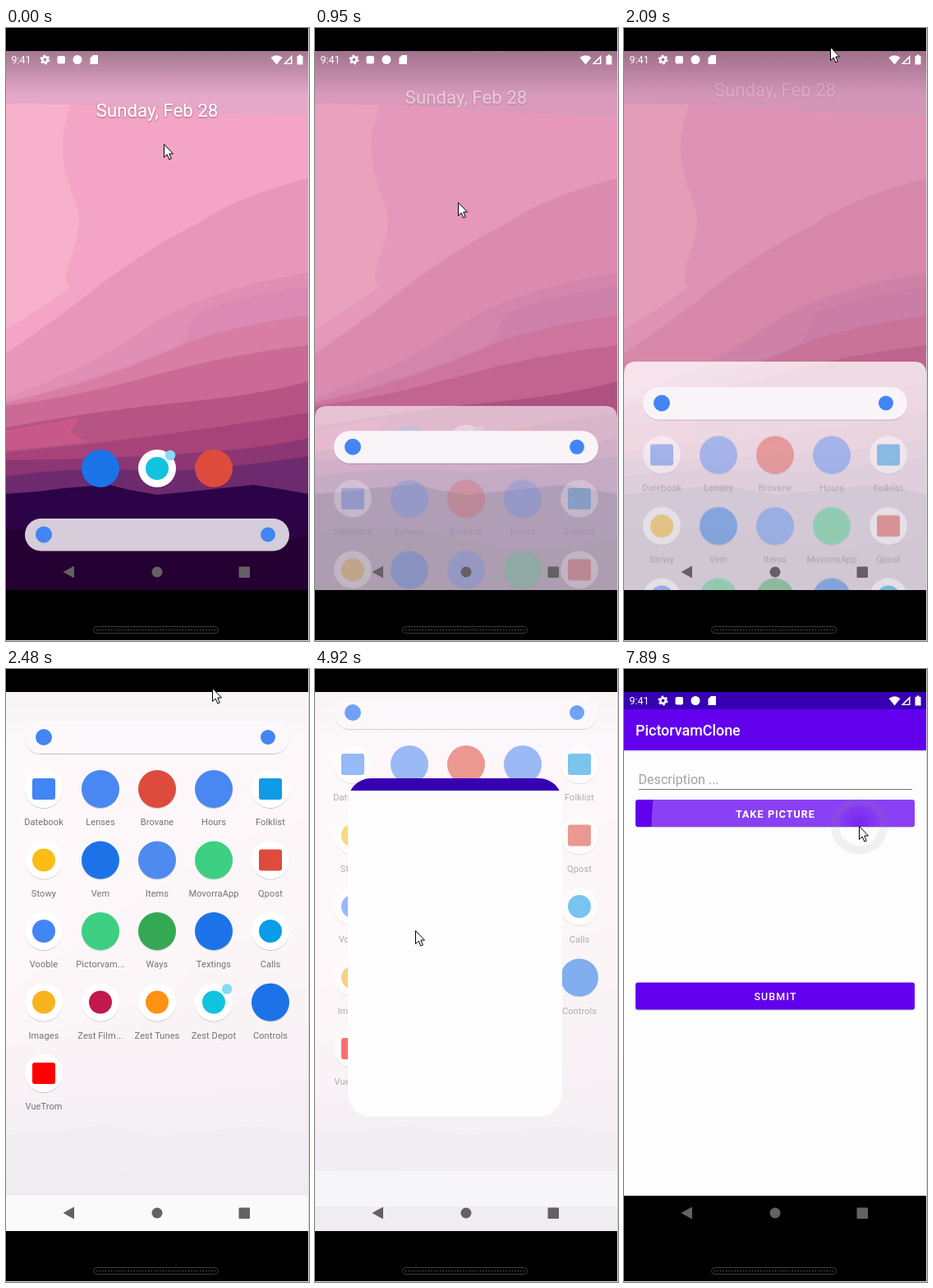
Write an HTML page that moves like this. It is 369 px wide and 746 px high and loops after 8 s.

```html
<!DOCTYPE html>
<html lang="en">
<head>
<meta charset="utf-8">
<title>Launcher demo</title>
<style>
  html, body { margin: 0; width: 100%; height: 100%; overflow: hidden; background: #000; }
  svg { display: block; width: 369px; height: 746px; font-family: Roboto, sans-serif; }
  .label { font-size: 11px; letter-spacing: .1px; fill: #737173; text-anchor: middle; }
  .button { font-size: 12.5px; font-weight: 500; letter-spacing: 1.12px; fill: #fff; text-anchor: middle; }
</style>
</head>
<body>
<svg viewBox="0 0 369 746">
  <defs>
    <linearGradient id="topShade" x2="0" y2="1">
      <stop offset="0" stop-color="#5c4556" stop-opacity=".48"/>
      <stop offset="1" stop-color="#5c4556" stop-opacity="0"/>
    </linearGradient>
    <radialGradient id="pressGlow">
      <stop offset="0" stop-color="#6a12ee" stop-opacity=".6"/>
      <stop offset="1" stop-color="#6a12ee" stop-opacity="0"/>
    </radialGradient>
    <filter id="textShadow" x="-10%" y="-50%" width="120%" height="200%">
      <feDropShadow dx="0" dy="1" stdDeviation="1" flood-color="#503040" flood-opacity=".6"/>
    </filter>
    <filter id="discShadow" x="-20%" y="-20%" width="140%" height="150%">
      <feDropShadow dx="0" dy="1" stdDeviation=".5" flood-color="#000" flood-opacity=".22"/>
    </filter>
    <clipPath id="screen"><rect y="28" width="368" height="656"/></clipPath>
    <clipPath id="windowClip"><rect id="windowShape"/></clipPath>
    <clipPath id="buttonClip"><rect x="14" y="159" width="340" height="33" rx="3"/></clipPath>
  </defs>

  <rect width="369" height="746"/>
  <g clip-path="url(#screen)">
    <g id="wallpaper">
      <rect y="28" width="368" height="656" fill="#f4a5c5"/>
      <path fill="#f8b1ca" d="M0 92H80C56 150 76 186 88 224C94 262 62 300 78 316Q30 350 0 366Z"/>
      <path fill="#e6a8c8" d="M0 28H368V107L250 103Q110 92 0 92Z"/>
      <path fill="#e997b8" d="M0 396Q60 356 120 308Q190 258 230 240Q280 205 368 183V684H0Z"/>
      <path fill="#e08fb5" d="M0 450Q110 410 170 366Q240 318 368 298V684H0Z"/>
      <path fill="#da8ab3" d="M0 456Q120 424 210 386C232 374 218 354 240 344Q290 326 368 314V684H0Z"/>
      <path fill="#d87da4" d="M0 456Q120 430 228 380Q290 360 368 350V684H0Z"/>
      <path fill="#cb6a95" d="M0 460Q100 446 190 420Q270 398 368 386V684H0Z"/>
      <path fill="#b65484" d="M0 486Q120 464 230 454Q310 446 368 430V684H0Z"/>
      <path fill="#c9588a" d="M0 490L90 474L78 492L100 504L0 514Z"/>
      <path fill="#a8437a" d="M0 516Q180 500 368 468V684H0Z"/>
      <path fill="#8c3673" d="M0 526Q150 524 240 516Q310 512 368 499V684H0Z"/>
      <path fill="#6e2a6e" d="M0 546Q90 532 190 540Q290 534 368 521V684H0Z"/>
      <path fill="#2c0346" d="M0 567L40 564L70 560L96 558L122 555L150 562L184 568L236 563L272 559L302 556L334 561L368 567V684H0Z"/>
      <path fill="#240033" d="M0 612Q90 600 180 622T368 618V684H0Z"/>
      <rect y="28" width="368" height="54" fill="url(#topShade)"/>
    </g>
    <rect id="dim" y="28" width="368" height="656" fill="#8a4a70"/>
    <text id="date" x="184" y="108" font-size="22.3" fill="#fff" text-anchor="middle" filter="url(#textShadow)">Sunday, Feb 28</text>
    <g id="dock"></g>
    <path id="sheet" fill="#fff"/>
    <g id="drawer">
      <rect id="navScrim" y="641" width="368" height="43" fill="#fff"/>
      <g id="content">
        <g id="searchBar">
          <rect id="searchFill" x="23" y="-19.5" width="322" height="39.5" rx="19.7"/>
          <circle cx="46" r="10" fill="#4285f4"/>
          <circle cx="319" r="9" fill="#4285f4"/>
        </g>
        <g id="icons"></g>
      </g>
    </g>
    <circle id="press" cx="115" cy="319" r="25"/>
    <g id="window" clip-path="url(#windowClip)">
      <rect y="28" width="368" height="656" fill="#fdfdfd"/>
      <rect id="windowBar" width="368" fill="#3700b3"/>
    </g>
    <rect id="navBlack" y="641" width="368" height="43"/>
    <g id="app">
      <rect y="99" width="368" height="2" fill="#000" opacity=".1"/>
      <rect y="49" width="368" height="50" fill="#6200ee"/>
      <text x="14" y="81" font-size="17.9" font-weight="500" fill="#fff">PictorvamClone</text>
      <text x="17.5" y="140" font-size="16.1" fill="#a2a2a2">Description ...</text>
      <rect x="18" y="146" width="333" height="1" fill="#777"/>
      <g id="buttons"></g>
      <g id="ripple">
        <g clip-path="url(#buttonClip)">
          <circle cx="286.5" cy="191" r="253" fill="#fff" opacity=".25"/>
          <circle cx="286.5" cy="188" r="27" fill="url(#pressGlow)"/>
        </g>
        <circle cx="286.5" cy="191" r="29.5" fill="none" stroke="#888" stroke-width="10" opacity=".11"/>
        <text class="button" x="184.5" y="180.5">TAKE PICTURE</text>
      </g>
    </g>
    <g id="status" fill="#fff">
      <text x="6.5" y="43.3" font-size="12.5">9:41</text>
      <circle cx="47.5" cy="38.5" r="3.2" fill="none" stroke="#fff" stroke-width="2.6"/>
      <circle cx="47.5" cy="38.5" r="5" fill="none" stroke="#fff" stroke-width="2" stroke-dasharray="2.6 2.64"/>
      <rect x="62.5" y="34" width="9.5" height="9.5" rx="2"/>
      <circle cx="87" cy="38.5" r="5.5"/>
      <path d="M106 33H112V44H102.5V36.5Z"/>
      <path d="M322.5 36Q329.5 30.5 336.5 36L329.5 44.5Z"/>
      <path d="M348.5 33V44H337.5ZM347 37L341 42.8H347Z" fill-rule="evenodd"/>
      <path d="M356.5 32.5H359.5V34H361.5V44.5H354.5V34H356.5Z"/>
    </g>
    <g fill="#646064">
      <path d="M69.5 662L83 654.5V669.5Z"/>
      <circle cx="184" cy="662" r="6.5"/>
      <rect x="283.5" y="655.5" width="13.5" height="13.5" rx="1"/>
    </g>
  </g>

  <rect x="106.5" y="728.5" width="152" height="8" rx="4" fill="none" stroke="#3c3c3c"/>
  <path d="M110 732.5H256" stroke="#3c3c3c" stroke-width="2" stroke-dasharray="1.5 2"/>
  <path d="M368.5 0V746M0 745.5H368" stroke="#d8d8d8"/>
  <path id="cursor" d="M.5 .5V16.5L4.2 13L6.8 19L9.3 18L6.8 12H11.5Z" fill="#fff" stroke="#000"/>
</svg>
<script>
const LOOP = 8000;
const HOME_Y = 616.5, OPEN_Y = 83;
const $ = id => document.getElementById(id);
const set = (id, attrs) => {
  for (const name in attrs) $(id).setAttribute(name, attrs[name]);
};
const show = (id, opacity) => set(id, { opacity });

// Icon kinds: full disc, or a white disc holding a round or square spot.
function icon(x, y, color, kind = 'full', badge = false) {
  const disc = `<circle cx="${x}" cy="${y}" r="23" fill="${kind === 'full' ? color : '#fff'}" filter="url(#discShadow)"/>`;
  const spot = {
    full: '',
    round: `<circle cx="${x}" cy="${y}" r="14" fill="${color}"/>`,
    square: `<rect x="${x - 14}" y="${y - 13}" width="28" height="26" rx="3" fill="${color}"/>`
  }[kind];
  return disc + spot + (badge ? `<circle cx="${x + 16}" cy="${y - 16}" r="6.3" fill="#84d9fc"/>` : '');
}

const apps = [
  ['Datebook', '#4285f4', 'square'], ['Lenses', '#4a87f2'], ['Brovane', '#dd4b3e'],
  ['Hours', '#4a87f2'], ['Folklist', '#0f9be6', 'square'],
  ['Stowy', '#fbbd16', 'round'], ['Vem', '#1a73e8'], ['Items', '#4f8af0'],
  ['MovorraApp', '#3ecf82'], ['Qpost', '#dd4b3e', 'square'],
  ['Vooble', '#4285f4', 'round'], ['Pictorvam...', '#3ecf82'], ['Ways', '#34a853'],
  ['Textings', '#1a73e8'], ['Calls', '#0a9ce8', 'round'],
  ['Images', '#f6b51e', 'round'], ['Zest Film...', '#c2184b', 'round'], ['Zest Tunes', '#ff9212', 'round'],
  ['Zest Depot', '#12c3e0', 'round', true], ['Controls', '#1a73e8'],
  ['VueTrom', '#f00', 'square']
];

$('icons').innerHTML = apps.map(([name, color, kind, badge], i) => {
  const x = 46 + 69 * (i % 5), y = 63 + 86.5 * Math.floor(i / 5);
  return icon(x, y, color, kind, badge) + `<text class="label" x="${x}" y="${y + 44}">${name}</text>`;
}).join('');

$('dock').innerHTML = icon(115, 536, '#1a73e8') + icon(184, 536, '#12c3e0', 'round', true) + icon(253, 536, '#dd4b3e');

$('buttons').innerHTML = [['TAKE PICTURE', 159], ['SUBMIT', 381.5]].map(([text, y]) =>
  `<rect x="14" y="${y + 1}" width="340" height="33" rx="3" opacity=".2"/>
   <rect x="14" y="${y}" width="340" height="33" rx="3" fill="#6200ee"/>
   <text class="button" x="184.5" y="${y + 21.5}">${text}</text>`).join('');

// Each step keeps the values of the one before it, unless it overrides them.
// open: drawer progress, veil: sheet opacity, win: x, y, width, height, radius, bar height.
const changes = [
  { at: 0, cursor: [192, 141], open: 0, veil: 0, ink: 0, scrim: 0, shift: 0, press: 0, win: null, nav: 0, app: 0, ripple: 0 },
  { at: 150, cursor: [174, 212] },
  { at: 580, open: .293, veil: .77, ink: .42 },
  { at: 700, open: .4, veil: .82, ink: .6 },
  { at: 950, open: .2, veil: .6, ink: .25 },
  { at: 1070, open: .05, veil: .1, ink: 0 },
  { at: 1220, open: 0, veil: 0 },
  { at: 2090, cursor: [251, 23], open: .3, veil: .77, ink: .42 },
  { at: 2210, open: .75, veil: .87, ink: .9, scrim: .3 },
  { at: 2360, open: .96, veil: .91, ink: 1, scrim: .6 },
  { at: 2480, open: 1, veil: .925, scrim: .75 },
  { at: 4000, cursor: [190, 170] },
  { at: 4120, cursor: [85, 337] },
  { at: 4240, cursor: [122, 318] },
  { at: 4490, press: .08 },
  { at: 4640, press: .15 },
  { at: 4920, press: 0, shift: -30, ink: .55, scrim: .4, win: [40, 133, 261, 412, 28, 15] },
  { at: 5070, shift: -42, ink: .3, win: [9, 54, 350, 600, 14, 19] },
  { at: 5190, win: [0, 28, 368, 656, 0, 21] },
  { at: 5340, nav: 1 },
  { at: 5710, app: .65 },
  { at: 5830, app: 1 },
  { at: 7890, cursor: [286, 191], ripple: 1 }
];
let last = {};
const steps = changes.map(change => last = { ...last, ...change });

function draw(s) {
  const searchY = HOME_Y + (OPEN_Y - HOME_Y) * s.open;
  const top = s.open === 1 ? 28 : Math.max(28, Math.round(searchY - 50));
  const r = s.open === 1 ? 0 : 15;
  set('sheet', { d: `M0 684V${top + r}Q0 ${top} ${r} ${top}H${368 - r}Q368 ${top} 368 ${top + r}V684Z`, opacity: s.veil });
  set('date', { transform: `translate(0 ${-82 * s.open})`, opacity: Math.max(0, 1 - s.open * 2.7) });
  set('dock', { transform: `translate(0 ${-150 * s.open})`, opacity: Math.max(0, 1 - s.open * 3.3) });
  show('dim', Math.min(.2, s.open * .7));
  set('drawer', { transform: `translate(0 ${s.shift})` });
  set('content', { transform: `translate(0 ${searchY})` });
  show('navScrim', s.scrim);
  show('icons', s.ink);
  show('searchBar', s.shift ? s.ink + .2 : 1);
  set('searchFill', {
    fill: s.open < .1 ? '#d5cdd9' : s.open < .9 ? '#f9f4f7' : '#fdf8fb',
    filter: s.open < .1 ? 'none' : 'url(#discShadow)'
  });
  show('press', s.press);

  show('window', s.win ? 1 : 0);
  if (s.win) {
    const [x, y, width, height, rx, bar] = s.win;
    set('windowShape', { x, y, width, height, rx });
    set('windowBar', { y, height: bar });
  }
  const fullscreen = s.win && s.win[0] === 0;
  show('status', fullscreen || s.open < .5 ? 1 : 0);
  show('navBlack', s.nav);
  show('app', s.app);
  show('ripple', s.ripple);
  set('cursor', { transform: `translate(${s.cursor})` });
}

let shown;
function tick() {
  const time = performance.now() % LOOP;
  const step = steps.findLast(s => s.at <= time);
  if (step !== shown) draw(shown = step);
  requestAnimationFrame(tick);
}
tick();
</script>
</body>
</html>
```
